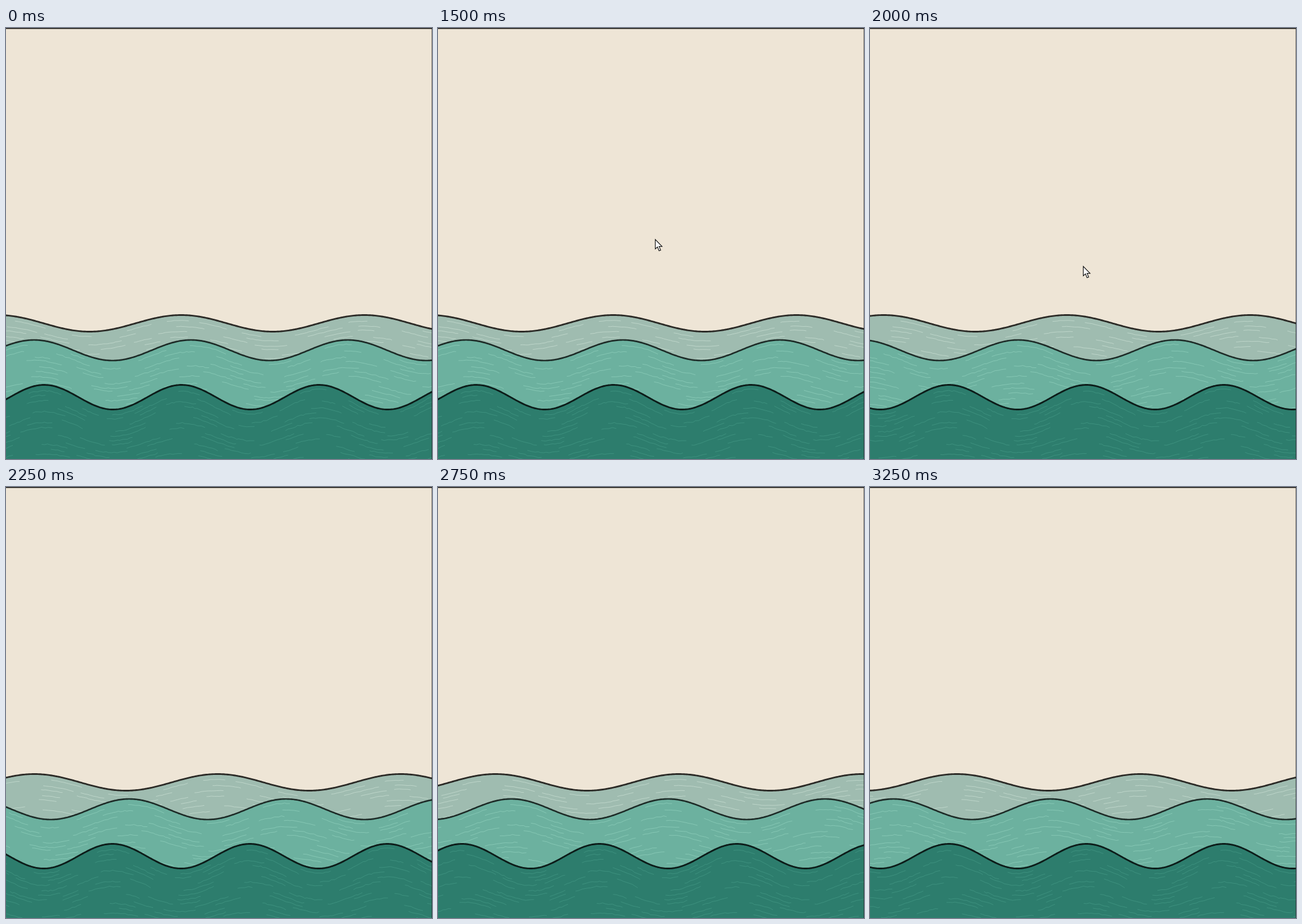
An HTML page with a canvas for the animation above (3500 ms loop, 744 by 753 pixels).

```html
<!DOCTYPE html>
<html lang="en">
<head>
<meta charset="utf-8">
<title>Waves</title>
<style>
html, body { margin: 0; width: 100%; height: 100%; overflow: hidden; background: #eee5d6; }
canvas { display: block; }
</style>
</head>
<body>
<canvas id="stage" width="744" height="753"></canvas>
<script>
const W = 744, H = 753, LOOP = 3500, STEP = 250, START = 1630;
const ctx = document.getElementById('stage').getContext('2d');

// crest: x of a crest at rest; speed in px/s; depth: how far the streaks reach down
const layers = [
  { y: 516, amp: 14.5, period: 320, crest: 306, speed: 102.4, depth: 64,
    fill: '#9fbcb0', line: '#2b2a26', width: 2.9, streak: 'rgba(211,230,219,.6)', rough: 0.5 },
  { y: 563, amp: 18, period: 274, crest: 323, speed: -174, depth: 106,
    fill: '#6cb19f', line: '#1d2b27', width: 2.7, streak: 'rgba(160,222,202,.5)', rough: 0.9 },
  { y: 645, amp: 21.5, period: 240, crest: 306.7, speed: 192, depth: 130,
    fill: '#2d7d6d', line: '#0c1c19', width: 2.9, streak: 'rgba(92,180,158,.36)', rough: 1 }
];

let seed = 11;
const rand = () => (seed = seed * 16807 % 2147483647) / 2147483647;

// Height of the wave at u px from a crest; it flattens slightly with depth d
const height = (l, u, d = 0) =>
  l.y + d - l.amp * (1 - d / 220) * Math.cos(2 * Math.PI * u / l.period);

function makeStreaks(l) {
  const path = new Path2D();
  for (let d = 9; d < l.depth; d += 8.5) {
    let u = -1000 + rand() * 90;
    while (u < 1000) {
      const end = u + 22 + rand() * 38;
      const depth = d + rand() * 4 - 2;
      path.moveTo(u, height(l, u, depth));
      while (u < end) {
        u += 3 + rand() * 5;
        path.lineTo(u, height(l, u, depth) + (rand() - 0.5) * 2 * l.rough);
      }
      u += 12 + rand() * 88;
    }
  }
  return path;
}
for (const l of layers) l.streaks = makeStreaks(l);

function drawWave(l, seconds) {
  const crest = l.crest + l.speed * seconds;
  const edge = new Path2D();
  for (let x = -4; x <= W + 4; x += 2) edge.lineTo(x, height(l, x - crest));
  const body = new Path2D(edge);
  body.lineTo(W + 4, H);
  body.lineTo(-4, H);
  ctx.fillStyle = l.fill;
  ctx.fill(body);

  ctx.save();
  ctx.translate(crest, 0);
  ctx.strokeStyle = l.streak;
  ctx.lineWidth = 1;
  ctx.stroke(l.streaks);
  ctx.restore();

  ctx.strokeStyle = l.line;
  ctx.lineWidth = l.width;
  ctx.stroke(edge);
}

const arrow = new Path2D('M0 0V16.5L3.8 13 6.6 19.8 9.4 18.6 6.6 12.2H11.8Z');
const cursorAt = { 1250: [566.5, 370.5], 1500: [379.5, 369.5], 1750: [379.5, 369.5], 2000: [372.5, 416.5] };

function drawCursor(t) {
  const spot = cursorAt[t];
  if (!spot) return;
  ctx.save();
  ctx.translate(...spot);
  ctx.fillStyle = '#fff';
  ctx.fill(arrow);
  ctx.strokeStyle = '#111';
  ctx.lineWidth = 1.2;
  ctx.stroke(arrow);
  ctx.restore();
}

function draw(now) {
  const t = Math.floor(now % LOOP / STEP) * STEP;
  const seconds = Math.max(0, t - START) / 1000;
  ctx.fillStyle = '#eee5d6';
  ctx.fillRect(0, 0, W, H);
  for (const l of layers) drawWave(l, seconds);
  ctx.fillStyle = 'rgba(25,24,21,.5)';
  ctx.fillRect(W - 1, 0, 1, H);
  ctx.fillStyle = '#191815';
  ctx.fillRect(0, 0, W, 1.6);
  drawCursor(t);
}

let begin;
function tick(now) {
  begin ??= now;
  draw(now - begin);
  requestAnimationFrame(tick);
}
draw(0);
requestAnimationFrame(tick);
</script>
</body>
</html>
```
